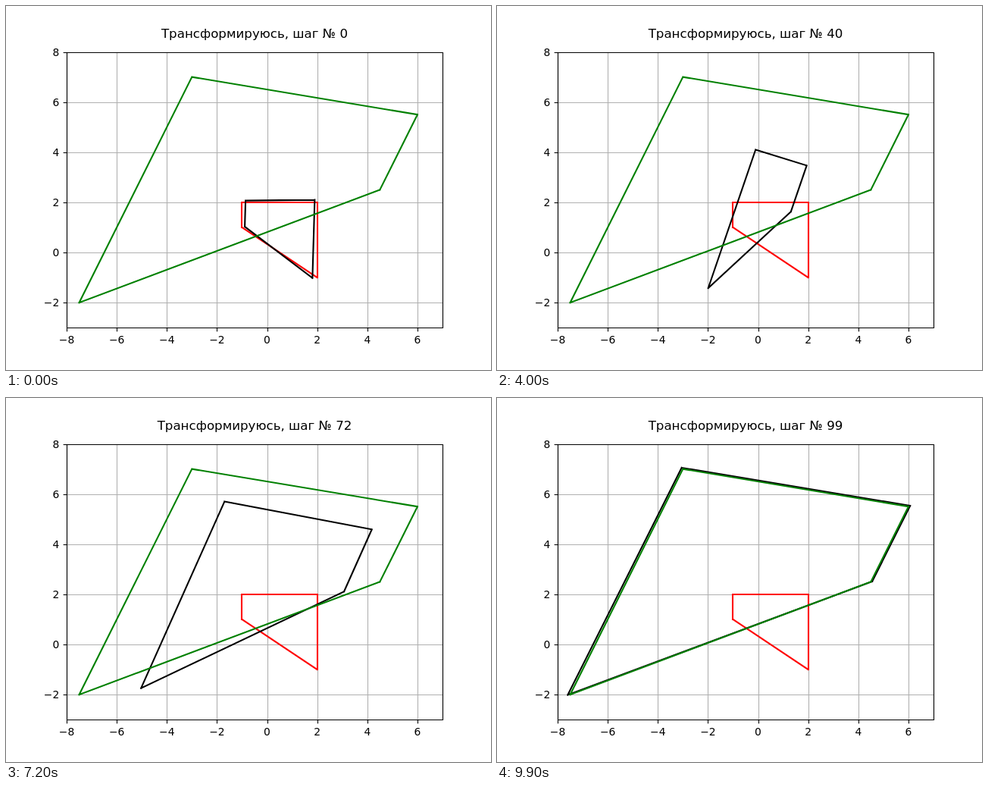
An HTML page that plays this animation: 640x480 px, repeating every 10 s.

```html
<!DOCTYPE html>
<html lang="ru">
<head>
<meta charset="utf-8">
<title>Трансформация</title>
<style>
  html, body { margin: 0; width: 100%; height: 100%; overflow: hidden; background: #fff; }
  svg { display: block; width: 640px; height: 480px; }
  text { font-family: "DejaVu Sans", sans-serif; font-size: 13.889px; fill: #000; }
  #title { font-size: 16.667px; }
  path { fill: none; stroke-width: 1.111; }
  .shape { stroke-width: 2.083; stroke-linecap: square; }
</style>
</head>
<body>
<svg viewBox="0 0 640 480"></svg>
<script>
const STEP_MS = 100, STEPS = 100, UNIT = 496 / 15;
const LEFT = 80, TOP = 60.533, RIGHT = 576, BOTTOM = 424.267;
const START = [[-1, 1], [-1, 2], [2, 2], [2, -1]];
const END = [[4.5, 2.5], [6, 5.5], [-3, 7], [-7.5, -2]];

const svg = document.querySelector('svg');
const px = x => LEFT + (x + 8) * UNIT;
const py = y => TOP + (8 - y) * UNIT;
const crisp = v => Math.floor(v + 0.5) + 0.5;

function add(tag, attrs, text = '') {
  const el = document.createElementNS('http://www.w3.org/2000/svg', tag);
  for (const key in attrs) el.setAttribute(key, attrs[key]);
  el.textContent = text;
  return svg.appendChild(el);
}

const line = (d, stroke) => add('path', { d, stroke });
const label = (x, y, anchor, value) =>
  add('text', { x, y, 'text-anchor': anchor }, String(value).replace('-', '\u2212'));

// Each side is its own stroke; upright and level sides sit on whole pixels.
function outline(points) {
  return points.map(([x1, y1], i) => {
    const [x2, y2] = points[(i + 1) % points.length];
    const fit = x1 === x2 || y1 === y2 ? Math.round : v => v;
    return `M${fit(px(x1))} ${fit(py(y1))}L${fit(px(x2))} ${fit(py(y2))}`;
  }).join('');
}

const shape = (points, stroke) => add('path', { class: 'shape', d: outline(points), stroke });

const x0 = crisp(LEFT), x1 = crisp(RIGHT), y0 = crisp(TOP), y1 = crisp(BOTTOM);

for (let v = -8; v <= 6; v += 2) {
  const x = crisp(px(v));
  line(`M${x} ${y0}V${y1}`, '#b0b0b0');
  line(`M${x} ${y1}v4.86`, '#000');
  label(px(v), 445, 'middle', v);
}
for (let v = -2; v <= 8; v += 2) {
  const y = crisp(py(v));
  line(`M${x0} ${y}H${x1}`, '#b0b0b0');
  line(`M${x0} ${y}h-4.86`, '#000');
  label(70.28, Math.round(py(v) + 5), 'end', v);
}

shape(START, '#ff0000');
const moving = shape(START, '#000');
shape(END, '#008000');
line(`M${x0} ${y0}H${x1}V${y1}H${x0}Z`, '#000');
const title = add('text', { id: 'title', x: 328, y: 42, 'text-anchor': 'middle' });

let shown = -1;
function draw() {
  const step = Math.floor(performance.now() / STEP_MS) % STEPS;
  if (step !== shown) {
    shown = step;
    const k = (step + 2) / 100;
    const points = START.map(([x, y], i) => [x + (END[i][0] - x) * k, y + (END[i][1] - y) * k]);
    moving.setAttribute('d', outline(points));
    title.textContent = `Трансформируюсь, шаг № ${step}`;
  }
  requestAnimationFrame(draw);
}
draw();
</script>
</body>
</html>
```
